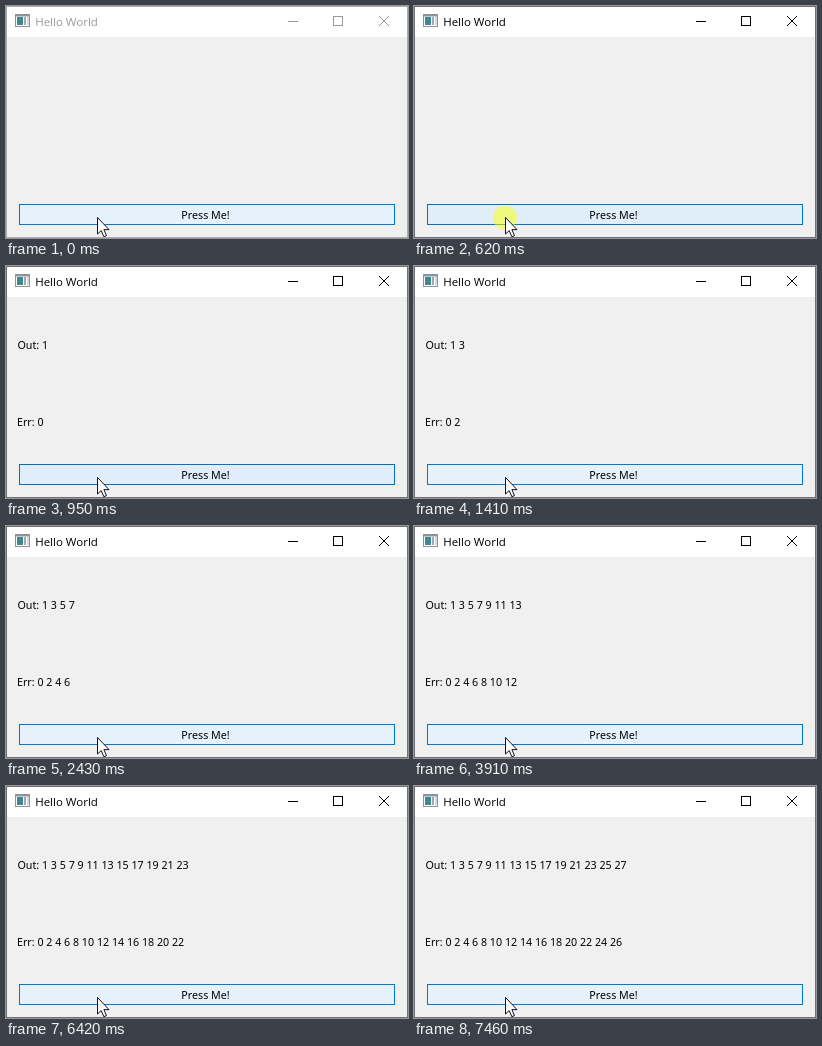
An HTML page for the animation above (7990 ms loop, 402 by 232 pixels).

```html
<!DOCTYPE html>
<html lang="en">
<head>
<meta charset="utf-8">
<title>Hello World</title>
<style>
  html, body { margin: 0; width: 100%; height: 100%; overflow: hidden; }
  svg { display: block; }
  text { font: 10.7px "Noto Sans", "Open Sans", sans-serif; }
  #title { font: 11.5px "Open Sans", "Noto Sans", sans-serif; }
  .controls { fill: none; stroke: currentColor; }
</style>
</head>
<body>
<svg width="402" height="232" viewBox="0 0 402 232">
  <rect width="402" height="232" fill="#f0f0f0"/>
  <rect width="402" height="31" fill="#fff"/>
  <rect id="frame" x=".5" y=".5" width="401" height="231" fill="none"/>

  <g id="icon">
    <rect x="9.5" y="8.5" width="14" height="12" fill="#fff" stroke="#8c9297"/>
    <path d="M9 9.5h15" stroke="#8c9297" stroke-width="2"/>
    <rect x="11" y="11" width="6" height="8" fill="#3f8791"/>
    <rect x="18" y="11" width="2" height="8" fill="#9aa9b8"/>
    <rect x="21" y="11" width="2" height="8" fill="#d5d9dd"/>
  </g>
  <g id="bar">
    <text id="title" x="29.2" y="20" fill="currentColor">Hello World</text>
    <g class="controls">
      <path d="M282 15.5h10M327.5 10.5h9v9h-9z" shape-rendering="crispEdges"/>
      <path d="M373 10l10 10M383 10l-10 10"/>
    </g>
  </g>

  <text id="out" x="11.5" y="83"></text>
  <text id="err" x="11" y="160"></text>

  <rect id="button" x="13.5" y="198.5" width="375" height="20"/>
  <text x="199.5" y="213" text-anchor="middle">Press Me!</text>
  <circle id="ring" cx="91" cy="212" r="12" fill="#ff0" opacity=".5"/>
  <path d="M91.5 211.5v16.5l3.7-3.5 2.6 6.2 2.7-1.1-2.6-6h5.1z" fill="#fff" stroke="#111122"/>
</svg>
<script>
const LOOP = 7990, FOCUS = 620, RELEASE = 810;
// When each new pair of numbers is printed
const ticks = [950, 1410, 1920, 2430, 2940, 3400, 3910, 4440, 4920, 5450, 5960, 6420, 6930, 7460];
// [start time, how far the button looks pressed]
const presses = [[0, 0], [620, .2], [670, .5], [740, .8], [RELEASE, 1], [880, .6], [950, .25], [1030, 0]];

const $ = id => document.getElementById(id);
const mix = (a, b, k) => `rgb(${a.map((v, i) => Math.round(v + (b[i] - v) * k))})`;

function draw(t) {
  const active = t >= FOCUS;
  const count = ticks.filter(tick => tick <= t).length;
  const press = presses.filter(([start]) => start <= t).pop()[1];
  const list = (label, first) =>
    count ? label + Array.from({ length: count }, (_, i) => 2 * i + first).join(" ") : "";

  $("frame").setAttribute("stroke", active ? "#707070" : "#aaa");
  $("bar").style.color = active ? "#000" : "#999";
  $("out").textContent = list("Out: ", 1);
  $("err").textContent = list("Err: ", 0);
  $("button").setAttribute("fill", mix([229, 241, 251], [204, 228, 247], press));
  $("button").setAttribute("stroke", mix([0, 120, 215], [0, 84, 153], press));
  $("ring").style.display = active && t < RELEASE ? "" : "none";
}

const begin = performance.now();
function tick() {
  draw((performance.now() - begin) % LOOP);
  requestAnimationFrame(tick);
}
tick();
</script>
</body>
</html>
```
